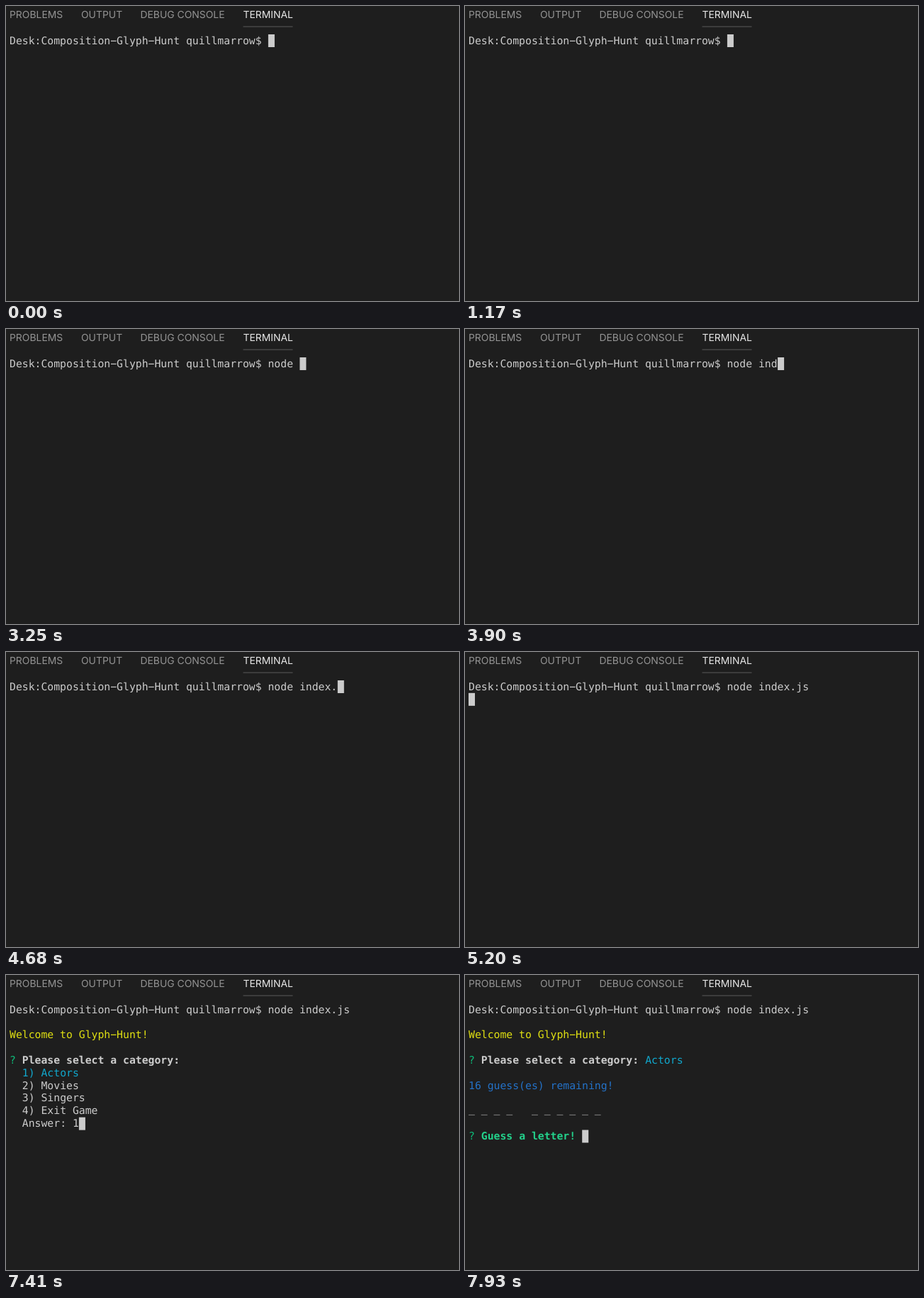
An HTML page that plays this animation: 639 by 416 pixels, repeating every 8 s.

```html
<!DOCTYPE html>
<html lang="en">
<head>
<meta charset="utf-8">
<title>Terminal session</title>
<style>
  html, body { margin: 0; width: 100%; height: 100%; overflow: hidden; background: #1e1e1e; }
  svg { display: block; }
  text { white-space: pre; text-rendering: geometricPrecision; }
  #tabs { font: 13.9px Inter, sans-serif; fill: #949494; }
  #tabs .active { fill: #e7e7e7; }
  #screen { font: 14.785px "DejaVu Sans Mono", monospace; fill: #ccc; }
  #screen .bold { font-weight: bold; }
  #screen .yellow { fill: #e0e012; }
  #screen .green { fill: #0dbc79; }
  #screen .bright { fill: #23d18b; font-weight: bold; }
  #screen .cyan { fill: #11a8cd; }
  #screen .blue { fill: #2472c8; }
</style>
</head>
<body>
<svg width="639" height="416" viewBox="0 0 639 416">
  <rect width="639" height="416" fill="#1e1e1e"/>
  <g id="tabs">
    <text x="5" y="17">PROBLEMS</text>
    <text x="106" y="17">OUTPUT</text>
    <text x="189.5" y="17">DEBUG CONSOLE</text>
    <text x="334.5" y="17" class="active">TERMINAL</text>
    <rect x="334.5" y="28.5" width="70" height="1.2" fill="#505050"/>
  </g>
  <g id="screen"></g>
</svg>
<script>
const LOOP = 8000, LEFT = 5, TOP = 40, CELL = 8.9, LINE = 17.85, BASE = 13.5;
const RUN = 5200, MENU = 5460, PICK = 7020, GAME = 7540;
// The wide dash is U+2212, as the terminal's font draws it
const PROMPT = 'Desk:Composition−Glyph−Hunt quillmarrow$ ';
const COMMAND = 'node index.js';
// When each character of the command is typed
const KEYS = [2210, 2340, 2470, 2730, 3250, 3640, 3770, 3900, 4160, 4290, 4680, 4810, 4940];
const screen = document.getElementById('screen');

const put = (row, col, text, style = '', dy = 0) =>
  `<text x="${LEFT + col * CELL}" y="${TOP + row * LINE + BASE + dy}" class="${style}">${text}</text>`;

const cursor = (row, col) =>
  `<rect x="${LEFT + col * CELL}" y="${TOP + row * LINE}" width="9" height="18"/>`;

function menu(answer) {
  return put(4, 2, 'Please select a category:', 'bold') +
    put(5, 2, '1) Actors', 'cyan') +
    ['2) Movies', '3) Singers', '4) Exit Game', 'Answer: ' + answer]
      .map((text, i) => put(6 + i, 2, text)).join('') +
    cursor(9, 10 + answer.length);
}

function game() {
  return put(4, 2, 'Please select a category:', 'bold') +
    put(4, 28, 'Actors', 'cyan') +
    put(6, 0, '16 guess(es) remaining!', 'blue') +
    put(8, 0, '_ _ _ _   _ _ _ _ _ _', '', -2) +
    put(10, 0, '?', 'green') +
    put(10, 2, 'Guess a letter!', 'bright') +
    cursor(10, 18);
}

function view(t) {
  const typed = KEYS.filter(key => key <= t).length;
  const shell = put(0, 0, PROMPT + COMMAND.slice(0, typed));
  if (t < RUN) return shell + cursor(0, PROMPT.length + typed);
  if (t < MENU) return shell + cursor(1, 0);
  return shell +
    put(2, 0, 'Welcome to Glyph−Hunt!', 'yellow') +
    put(4, 0, '?', 'green') +
    (t < GAME ? menu(t < PICK ? '' : '1') : game());
}

let shown = '';
function tick() {
  const next = view(performance.now() % LOOP);
  if (next !== shown) screen.innerHTML = shown = next;
  requestAnimationFrame(tick);
}
tick();
</script>
</body>
</html>
```
